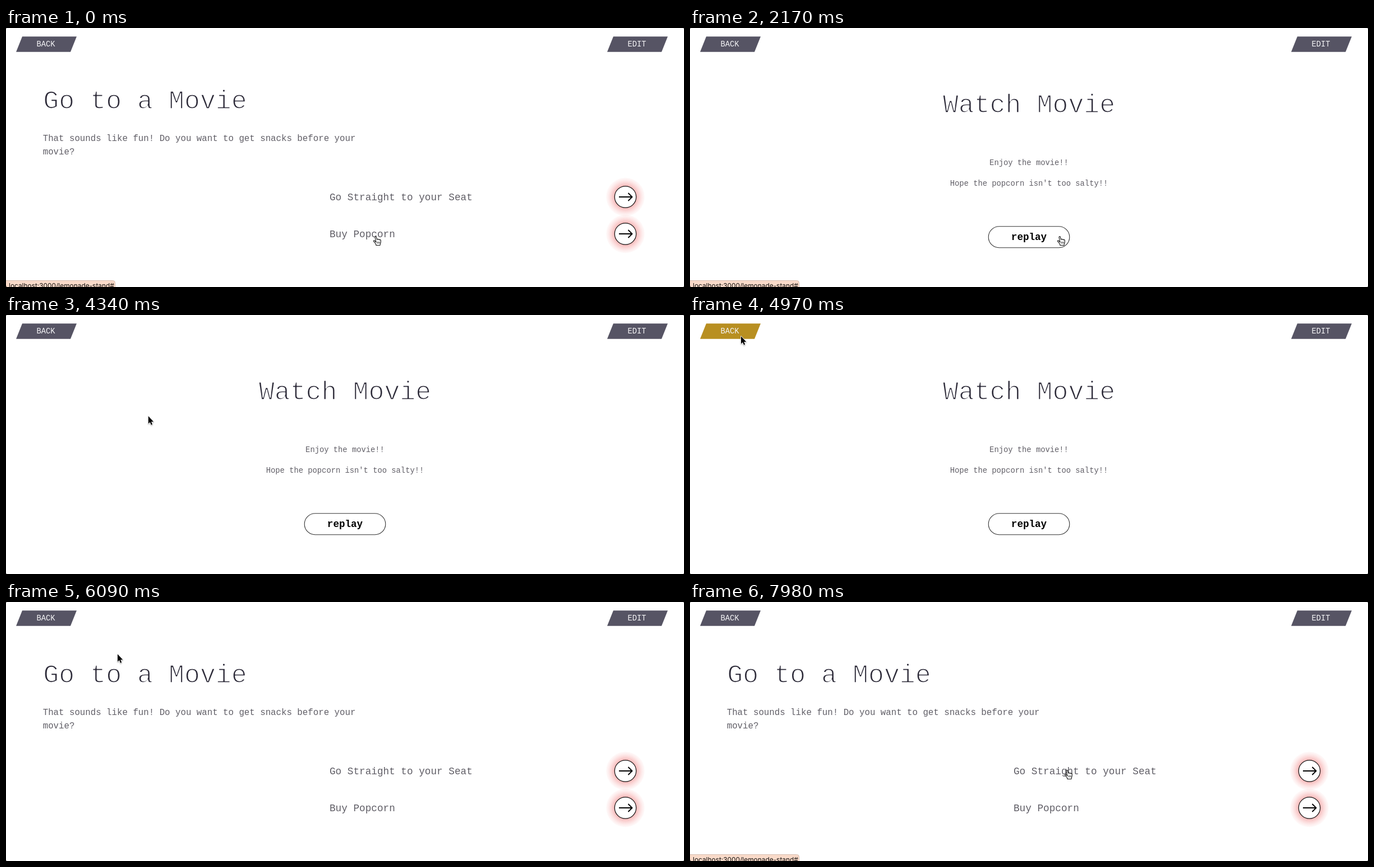
An HTML page with a canvas for the animation above (8000 ms loop, 1209x463 px).

```html
<!DOCTYPE html>
<html lang="en">
<head>
<meta charset="utf-8">
<title>Story player</title>
<style>
  html, body { margin: 0; width: 100%; height: 100%; overflow: hidden; background: #fff; }
  canvas { display: block; }
</style>
</head>
<body>
<canvas id="stage" width="1209" height="463"></canvas>
<script>
const ctx = document.getElementById('stage').getContext('2d');
const W = 1209, H = 463, LOOP = 8000, STEP = 70;
const MONO = '"Courier New", "Liberation Mono", monospace';
const SANS = 'Inter, sans-serif';
const PAPER = '#fff', INK = '#2d2b39', BODY = '#605e66', SLATE = [86, 84, 100], GOLD = [217, 162, 10];

const HAND = new Path2D('M5 11 L2.4 8.3 C.8 7 -.2 8.5 1 9.9 L4.4 14 L5 16.5 H12 L12.3 14.5 ' +
  'C13.6 12 13.6 10 13.3 7.6 C13 6.2 11.4 6 11.1 7 C10.9 5.5 9.2 5.3 8.8 6.4 ' +
  'C8.4 5 6.8 5 6.5 6 L5.4 1.7 C4.8 0 2.6 .5 3 2.3 Z');
const KNUCKLES = new Path2D('M7.2 10 V13.4 M9.2 10 V13.4 M11.2 10 V13.4');
const ARROW = new Path2D('M0 0 V13.4 L3 10.7 L5.1 15.6 L7.2 14.7 L5.2 10 H9.3 Z');
const BEAM = new Path2D('M-3.5 -7.5 Q0 -7.5 0 -5 Q0 -7.5 3.5 -7.5 M0 -5 V5 M-3.5 7.5 Q0 7.5 0 5 Q0 7.5 3.5 7.5 M-2 2 H2');

// Pointer hot spot: time, x, y
const TRACK = [
  [0, 659, 372], [2380, 659, 372], [2800, 658.5, 358], [3010, 634, 331],
  [3920, 634, 331], [4130, 440, 262], [4340, 253.8, 180.8], [4550, 160, 104],
  [4760, 108, 50], [4970, 91, 38], [5250, 80, 32], [5670, 80, 32],
  [6090, 199, 93.3], [6510, 330, 129], [6860, 540, 235], [7210, 672, 298],
  [7280, 672, 298], [7350, 672, 300]
];

const clamp = v => Math.max(0, Math.min(1, v));
const ramp = (t, from, to) => clamp((t - from) / (to - from));
const mix = (a, b, k) => a + (b - a) * k;

function pointerAt(t) {
  const next = TRACK.findIndex(p => p[0] > t);
  if (next < 0) return TRACK[TRACK.length - 1].slice(1);
  const a = TRACK[next - 1], b = TRACK[next], k = ramp(t, a[0], b[0]);
  return [mix(a[1], b[1], k), mix(a[2], b[2], k)];
}

function text(str, x, y, size, color, align = 'left', family = MONO, weight = '') {
  ctx.font = `${weight} ${size}px ${family}`;
  ctx.textAlign = align;
  ctx.fillStyle = color;
  ctx.fillText(str, x, y);
}

// Large headings have hairline strokes, so the glyph edges are trimmed back.
function heading(str, x, y, align) {
  text(str, x, y, 46.6, INK, align);
  ctx.strokeStyle = PAPER;
  ctx.lineWidth = 1.7;
  ctx.lineJoin = 'round';
  ctx.strokeText(str, x, y);
}

function box(x, y, w, h, radius, fill, stroke, line = 1) {
  ctx.beginPath();
  ctx.roundRect(x, y, w, h, radius);
  if (fill) { ctx.fillStyle = fill; ctx.fill(); }
  if (stroke) { ctx.strokeStyle = stroke; ctx.lineWidth = line; ctx.stroke(); }
}

function slantButton(x, label, hover) {
  ctx.beginPath();
  ctx.moveTo(x + 11, 15.2);
  ctx.lineTo(x + 108, 15.2);
  ctx.lineTo(x + 97, 42.8);
  ctx.lineTo(x, 42.8);
  ctx.fillStyle = `rgb(${SLATE.map((c, i) => Math.round(mix(c, GOLD[i], hover)))})`;
  ctx.fill();
  text(label, x + 53, 33, 13.8, '#f4f4f6', 'center');
}

function choice(label, y) {
  const x = 1104.5;
  text(label, 577, y + 5.5, 17.7, BODY);
  const glow = ctx.createRadialGradient(x, y, 18, x, y, 35);
  glow.addColorStop(0, 'rgba(240,120,120,.58)');
  glow.addColorStop(.35, 'rgba(242,130,130,.36)');
  glow.addColorStop(.7, 'rgba(244,140,140,.16)');
  glow.addColorStop(1, 'rgba(244,140,140,.02)');
  ctx.fillStyle = glow;
  ctx.beginPath();
  ctx.arc(x, y, 34.5, 0, Math.PI * 2);
  ctx.fill();
  box(x - 19.2, y - 19.2, 38.4, 38.4, 19.2, PAPER, '#111', 1.2);
  ctx.beginPath();
  ctx.moveTo(x - 11.5, y);
  ctx.lineTo(x + 12, y);
  ctx.moveTo(x + 5, y - 7);
  ctx.lineTo(x + 12, y);
  ctx.lineTo(x + 5, y + 7);
  ctx.lineJoin = 'miter';
  ctx.lineWidth = 1.9;
  ctx.strokeStyle = '#000';
  ctx.stroke();
}

function choicePage() {
  heading('Go to a Movie', 66.3, 143.5, 'left');
  text('That sounds like fun! Do you want to get snacks before your', 65.7, 202, 15.75, BODY);
  text('movie?', 65.7, 226, 15.75, BODY);
  choice('Go Straight to your Seat', 302);
  choice('Buy Popcorn', 368);
}

function endPage() {
  heading('Watch Movie', 604.5, 150.5, 'center');
  text('Enjoy the movie!!', 604.5, 244.5, 13.8, BODY, 'center');
  text("Hope the popcorn isn't too salty!!", 604.5, 281.5, 13.8, BODY, 'center');
  box(532.2, 354.7, 144.6, 38, 19, PAPER, '#333', 1.1);
  text('replay', 604.5, 379, 17.6, '#000', 'center', MONO, 'bold');
}

function tooltip() {
  ctx.save();
  ctx.shadowColor = 'rgba(0,0,0,.25)';
  ctx.shadowBlur = 3;
  ctx.shadowOffsetY = 1;
  box(658.5, 388.5, 95, 20, 2.5, '#e8e3e2');
  ctx.restore();
  box(658.5, 388.5, 95, 20, 2.5, null, '#d3cecd');
  text('Follow this path', 665.5, 402, 10.8, '#343030', 'left', SANS);
}

function statusBar(alpha) {
  if (!alpha) return;
  ctx.save();
  ctx.globalAlpha = alpha;
  box(-5, 451.5, 199.5, 20, 4, '#f9dac9', '#d5bdb0');
  text('localhost:3000/lemonade-stand#', 5, 465, 11.9, '#151210', 'left', SANS);
  ctx.fillStyle = '#6b5a52';
  ctx.fillRect(0, 461, 1, 2);
  ctx.restore();
}

function pointer(t) {
  const [x, y] = pointerAt(t);
  const hand = t < 2870 || t >= 7350;
  const beam = x > 53 && x < 89 && y > 21 && y < 38;
  ctx.save();
  ctx.translate(hand ? x - 4 : x, y);
  ctx.lineJoin = 'round';
  if (hand) {
    ctx.fillStyle = '#fff';
    ctx.fill(HAND);
    ctx.strokeStyle = '#111';
    ctx.lineWidth = 1.1;
    ctx.stroke(HAND);
    ctx.lineWidth = .8;
    ctx.stroke(KNUCKLES);
  } else if (beam) {
    for (const [color, width] of [['#fff', 3], ['#111', 1.4]]) {
      ctx.strokeStyle = color;
      ctx.lineWidth = width;
      ctx.stroke(BEAM);
    }
  } else {
    ctx.shadowColor = 'rgba(0,0,0,.35)';
    ctx.shadowBlur = 2;
    ctx.shadowOffsetY = 1;
    ctx.strokeStyle = '#fff';
    ctx.lineWidth = 1.6;
    ctx.stroke(ARROW);
    ctx.shadowColor = 'transparent';
    ctx.fillStyle = '#000';
    ctx.fill(ARROW);
  }
  ctx.restore();
}

function windowCorners() {
  ctx.fillStyle = '#555';
  for (const x of [0, W - 1]) for (const y of [0, H - 1]) ctx.fillRect(x, y, 1, 1);
}

function draw(t) {
  ctx.fillStyle = PAPER;
  ctx.fillRect(0, 0, W, H);
  const ending = t >= 2100 && t < 5600;
  if (ending) endPage(); else choicePage();
  const hover = ramp(t, 4760, 5040) * (1 - ramp(t, 5740, 6020));
  slantButton(18, 'BACK', hover);
  slantButton(1072, 'EDIT', 0);
  statusBar(t < 4000 ? 1 - ramp(t, 2380, 2590) : ramp(t, 7280, 7490));
  if (t >= 140 && t < 2100) tooltip();
  pointer(t);
  windowCorners();
}

const start = performance.now();
function frame() {
  const t = (performance.now() - start) % LOOP;
  draw(Math.floor(t / STEP) * STEP);
  requestAnimationFrame(frame);
}
frame();
</script>
</body>
</html>
```
